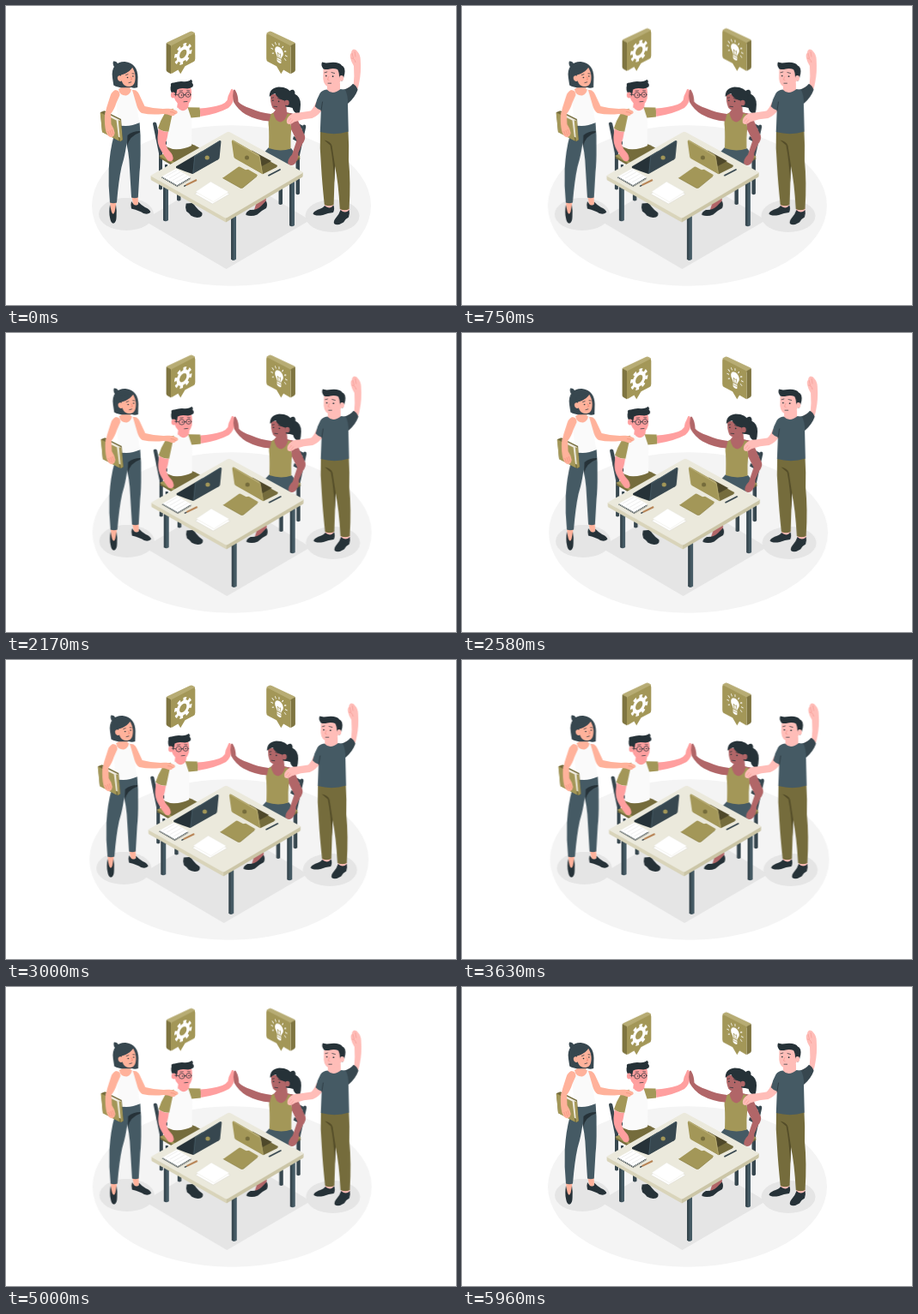
These frames come from a looping animation (524 by 349 pixels, 6000 ms). An HTML page:

```html
<!DOCTYPE html>
<html lang="en">
<head>
<meta charset="utf-8">
<title>Team at a table</title>
<style>
html, body { margin: 0; width: 100%; height: 100%; overflow: hidden; background: #fff; }
svg { display: block; width: 100%; height: 100%; }
.olive { fill: #a39758; }
.moss { fill: #756c3c; }
.slate { fill: #455a64; }
.deep { fill: #37474f; }
.ink { fill: #263238; }
.white { fill: #fafafa; }
.peach { fill: #ffb29b; }
.pink { fill: #ff9f9f; }
.rose { fill: #ffbdb8; }
.brown { fill: #b16668; }
.line { fill: none; stroke: #263238; stroke-width: .7; stroke-linecap: round; stroke-linejoin: round; }
.lit { fill: none; stroke: #fff; stroke-linecap: round; }
</style>
</head>
<body>
<svg viewBox="0 0 524 349">
<defs>
  <g id="tile">
    <path fill="#b7ac74" d="M187 43.5 Q187 42.7 188 42.2 L214 29.9 Q216 29 217.5 30 L220 31.4 L220 34 L192 48 Z"/>
    <path fill="#7f7541" d="M186.6 43.2 L192 46.2 L192 79.2 L188 77 Q186.6 76 186.6 74.5 Z"/>
    <path class="olive" d="M192 48.2 Q192 46.5 193.5 45.7 L217.5 33.2 Q220.3 31.8 220.3 34.5 L220.3 61.5 Q220.3 64 218.5 65 L208.5 70.2 L203.2 79.2 L200.4 74.5 L193.6 78.6 Q192 79.6 192 77.5 Z"/>
  </g>
</defs>

<g id="scene">
  <ellipse cx="262.5" cy="233" rx="162.5" ry="93.7" fill="#f4f4f4"/>
  <g fill="#e5e5e5">
    <ellipse cx="140" cy="243" rx="32" ry="19"/>
    <ellipse cx="380" cy="245" rx="31.5" ry="19"/>
    <path d="M160 250 L256.5 307 L354 250 L258 192 Z"/>
  </g>

  <!-- chairs -->
  <g class="deep">
    <path d="M171 137.5 Q171 135.6 173 135.5 Q174.8 135.5 175.2 137 L182 168 L182 213.5 Q180 215.5 178 213.5 L178 172 Z"/>
    <path d="M174 151 L187 158 L187 162 L175 156 Z"/>
    <path d="M199 185 H203.5 V226.5 Q201.2 228.5 199 226.5 Z"/>
    <path d="M185 185 H188 V205 H185 Z"/>
    <path d="M349.3 141 Q349.3 138.6 347.2 138.6 Q345.6 138.8 345.2 140.5 L337.5 172 L337.5 219 Q339.7 221.5 342 219 L342 174 Z"/>
    <path d="M335 134 L346 140 L345 143.5 L335 138 Z"/>
    <path d="M335 152 L344 157 L343.2 160.5 L334 155.5 Z"/>
    <path d="M317.5 190 H322 V231 Q319.7 233 317.5 231 Z"/>
  </g>
  <path class="moss" d="M178 177 L202 167 L224 178 L200 190 Z"/>
  <path class="olive" d="M178 175 L202 164 L224 175 L200 187 Z"/>
  <path class="moss" d="M300 178 L324 167 L343 178 L322 191 Z"/>
  <path class="olive" d="M300 175 L324 164 L343 176 L322 188 Z"/>

  <!-- woman standing -->
  <g>
    <path class="peach" d="M121 226 L128.5 226 L127.5 240 L125 247 L122 240 Z M146 221 L153.5 221 L154 231 L149 235 Z"/>
    <path class="ink" d="M121 232 Q119.6 241 121 247 Q122 253.5 125 253.8 Q128.5 253 128.6 246 Q129.2 239 128 232 L126.6 240 Q124.8 245.5 122.8 240 Z"/>
    <path class="ink" d="M146 228 Q144.8 232 146 236.5 Q156 239 160 242 Q166 243.7 168.3 240.8 Q168 237.5 162 235 Q157 232 154 228.5 Q155 234 149 232 Z"/>
    <path class="slate" d="M136 139 L155.5 136 Q157 150 156.6 166 Q156.8 182 155.5 194 L153.8 223.5 Q150 225 146 223.5 L144 190 Q143.5 170 138 152 Z"/>
    <path class="slate" d="M130 138.5 Q142 141 155 136.5 L155.8 146 Q147 147 141.5 151 Q140 170 134.5 188 Q131 204 129 229.5 Q125 231 121 229.5 Q119 210 119.7 190 Q121 168 125.5 152 Z"/>
    <path class="ink" d="M156 146 Q147 146 141.5 151 L141 164 Q143 152 156 147.5 Z"/>
    <path class="peach" d="M131 97 Q136 95 136.5 90 L145 92 L144.5 97 L151.5 98.5 L148 106 L132 106 Z"/>
    <path class="white" d="M131 97.5 Q133 105 140 104.5 Q145 103 146 97 L150.5 97.5 Q153 104 152.5 112 Q153 125 155.3 136.3 Q143 142 129.5 138.7 Q130.5 125 128 112 Q127 102 131 97.5 Z"/>
    <path class="deep" d="M124 84 C122 71 129 64.6 138.5 65 C149 66 153.5 74 153.5 83 L153.2 95 Q149 96.5 146 95 L138 95.3 Q130 95.5 125.3 92.5 Z"/>
    <path class="deep" d="M126.8 72 Q123.6 68.5 125 64.6 Q128.5 64 130.5 68 Z"/>
    <path class="peach" d="M134 80 C139 79 144.5 75.5 147 71.5 C150 76 151.4 82 150.2 87.5 C149 94.5 143 95.3 138 92.4 C135 90 133.6 85.5 134 80 Z"/>
    <ellipse class="peach" cx="132.8" cy="84.6" rx="2.9" ry="3.4" transform="rotate(-15 132.8 84.6)"/>
    <path class="deep" d="M132 74 L148 70 Q145 77.5 134 80.5 Q130 80 132 74 Z"/>
    <circle class="ink" cx="141.5" cy="83.5" r=".8"/><circle class="ink" cx="147.9" cy="82" r=".8"/>
    <path class="line" d="M139.5 80.6 L142 79.6 M147 78.8 L149 79 M143 89.6 L145.8 88.8"/>
    <path fill="none" stroke="#ef7d6b" stroke-width=".7" d="M145.2 82.5 L146.6 85.6 L144.8 86.2"/>
    <!-- books -->
    <path class="moss" d="M110 124 L114.5 122.3 L134 132 L136 156.5 L133 158 L112 147 Z"/>
    <path fill="#eeeade" d="M115 124 L133.2 133.3 L135 154.5 L129 152 Z"/>
    <path class="olive" d="M109.6 124.2 L128.5 133.6 L131.5 157.5 L112 147.3 Z"/>
    <path class="olive" d="M130.8 133.2 L133.6 134 L135.6 156 L133 158 Z"/>
    <path class="peach" d="M127 98 Q132.5 98 132.5 104 L128.5 113 Q126 121 122 126 L122.5 138 Q126 143 126.6 148 Q126 154 121 153 Q117.5 151 116.3 146 Q114.4 138 115 127 Q117 118 120.5 108 Q122.5 100 127 98 Z"/>
    <path fill="none" stroke="#ef8a78" stroke-width=".6" d="M118.6 146 L120.5 151 M121 145 L123 151.5 M123 144 L125 150"/>
  </g>

  <!-- man seated -->
  <g>
    <path class="ink" d="M209.7 230.5 Q208.3 235 210 239.5 Q213 241.5 215.5 244.8 Q220 247.8 226 246.6 Q229.3 245 228.3 241.3 Q224 238.5 221 234.5 Q219 231 216.5 230 Z"/>
    <path class="moss" d="M187 164 Q200 160 214 160.5 Q224 163 232 172 L228 184 L206 187 L190 179 Z"/>
    <path class="pink" d="M200 111 L213 112 L212 121 Q206 127 199 120 Z"/>
    <path class="white" d="M193 121 L200 118.5 Q206 126 212 118.5 L216 120 Q216.5 139 216 163 Q207 168 194 167 L187.5 164.5 Q188 153 189 143 Z"/>
    <path class="olive" d="M195 119.8 Q188 120 184.5 126 Q180 133 177 142.5 Q182 147 189.3 146.8 L192 134 Z"/>
    <path class="olive" d="M211.5 118.3 L225.5 118.6 Q227 124 226 129.5 L215.5 130.5 Z"/>
    <path class="pink" d="M225.8 119.4 Q239 118.8 251 115 Q256 112.8 257.6 110 Q258.5 104 261 100 Q262.2 96 263.7 97 Q265.7 98.5 265.3 106 Q265 114 259 119 Q246 126 226.3 129 Z"/>
    <path class="pink" d="M177.5 143.2 Q183 147 189 146.8 Q188 154 185.8 160 Q187 166 191 170 Q195 174 194.5 179 Q193 182.5 188.5 180.5 Q184.5 176 180.5 168.5 Q176 161 176.5 153 Z"/>
    <path class="pink" d="M195 96 Q202 92 214.5 93 Q217 100 215.7 108 Q213.5 116 207 116.3 Q198 115.5 195.5 106 Z"/>
    <path class="ink" d="M193.6 103 Q190.5 97 192 93 Q191 89.5 195.5 89.6 Q202 87.2 207 88.2 Q213 88.5 215.6 85.8 Q217.8 87.6 216.6 89.8 Q218.8 91.5 217.4 94.3 Q214.5 97 209 96.3 Q202.5 95.4 199.3 97.6 Q198.5 102 197.6 105.5 Z"/>
    <ellipse class="pink" cx="194.6" cy="104" rx="2.7" ry="3.4"/>
    <g class="line"><circle cx="204" cy="104" r="3.2"/><circle cx="212" cy="103.5" r="2.9"/><path d="M196 103.2 L200.8 103.8 M207.2 103.6 H209.1 M202 99.2 L205.5 98.9 M210.8 98.7 L213.6 99 M207 111.8 L211 111.4"/></g>
    <circle class="ink" cx="204.6" cy="104" r=".8"/><circle class="ink" cx="212.2" cy="103.5" r=".8"/>
  </g>
  <path class="peach" d="M147 98 Q152.5 97.5 155 103 L161.5 117 Q174 120.5 187 119.8 Q194 119 199 122.5 Q201 125.5 197 126.2 Q196 129 192 128 Q188 126 183 126 Q169 127.5 158 125 Q154.5 123 152.5 117 Z"/>
  <path fill="none" stroke="#ef8a78" stroke-width=".6" d="M191 123.5 Q195 123.5 197.5 126"/>

  <!-- woman seated -->
  <g>
    <path class="brown" d="M294 222 L303 222 L302.5 232 Q297 238 289 238 Z"/>
    <path class="ink" d="M302.8 227.5 Q305 232 303 236 Q297 239 292.5 243.4 Q286 246.3 279.5 244 Q278.5 241 284 238 Q292 238.5 297 233.5 Z"/>
    <path class="slate" d="M306 165 Q320 170 332 166 Q338 172 336 183 L322 190 L296 176 Z"/>
    <path class="ink" d="M328 105 Q331 101.5 336 102.5 Q343 105.5 343 115 Q343 121 341.3 126 Q335 125.5 333.6 119 L326 117 Z"/>
    <path class="ink" d="M329.5 101.5 Q330.5 97 334.5 97.8 Q337 99.5 336.3 103 L331 106 Z"/>
    <path class="brown" d="M315 117 L326 113 L327 124 Q332 125 334.5 127 L327 139 L312 137 L306 127 Q314 125 315 117 Z"/>
    <path class="brown" d="M331 125 Q336.5 125 338.8 131 Q343 141 348 151.5 Q349 156 345 161 L340.5 171 Q340.5 180 336 184.5 Q331 188 328.2 183.5 Q328 178.5 333 173.5 L338.5 157 L331.5 143 Z"/>
    <path class="olive" d="M307 126.7 Q309.5 126 311.5 124.8 Q313 135 320 135.4 Q326 133.5 327.6 125.5 L331 126 Q329.5 134 332.3 142 Q331 154 331.5 166.5 Q319 170.5 306 166 Q306.5 152 306 142 Q304.8 133 307 126.7 Z"/>
    <path class="brown" d="M308.5 126 Q296 124.5 284.5 119.5 Q274 116 270.5 111.8 Q270.2 104 267.2 98.8 Q266 96.2 264.8 98.5 Q263.3 105 265 112 Q270 121 279 126.5 Q292 133.5 306.5 134.5 Z"/>
    <path class="brown" d="M308.3 102 L327 105 Q328 116 321.5 120.3 Q313.5 123.5 310.2 118.5 Q307 111 308.3 102 Z"/>
    <path class="ink" d="M306.8 106 Q306.3 96 317.5 94.6 Q330 94.6 333 103.5 Q334.3 112 330.5 118 L325.5 117.5 L324.5 110.5 Q316 108.5 313.3 102 Q309.5 103 306.8 106 Z"/>
    <ellipse class="brown" cx="327" cy="113" rx="2.7" ry="3.3"/>
    <circle class="ink" cx="310.8" cy="110.2" r=".8"/><circle class="ink" cx="317.6" cy="111.4" r=".8"/>
    <path class="line" d="M309.5 107.3 L311.5 106.8 M316.6 107.7 L319.6 108.7 M312 117.2 L315.6 117.6"/>
  </g>

  <!-- man standing -->
  <g>
    <path class="rose" d="M371 230 H381 V238 H371 Z M389.5 235 H399.5 V243 H389.5 Z"/>
    <path class="ink" d="M371 233 Q369 236 363 237.7 Q358 240 357.5 242.5 Q360 245.6 369 244 Q375 241.5 381 241 Q383 237 381.4 232.5 Q377 238 371 233 Z"/>
    <path class="ink" d="M389.5 238 Q388 243 384 247.5 Q381 251 382 254 Q386 257 393 252.5 Q395 248.5 399 246.5 Q400.5 242 399.6 238 Q395 243 389.5 238 Z"/>
    <path class="moss" d="M366 146 L398.5 146 Q399.5 162 399 180 Q401.5 205 399.6 237 Q394.5 239.5 388.8 237 Q387 205 383 187 L381.6 232 Q376 234.5 370.8 232 Q368 205 367 187 Q365 166 366 146 Z"/>
    <path fill="#544d29" d="M370.5 156.5 Q378 158 379.5 163 L383 186 L382.3 206 Q381 180 377.5 162.5 Z"/>
    <path class="rose" d="M374 91 L389 90 L389 100 Q382 106 374 100 Z"/>
    <path class="rose" d="M404.5 95 Q406 82 405 70 Q402 65.5 401 60.5 Q400.2 56.4 402 55 Q402.2 51.2 405 50.6 Q408 50.8 409 53 Q412.8 56.8 412.8 63 Q413.8 77 411.3 89 Q410 97 407 102 L399 105 L398 95 Z"/>
    <path fill="none" stroke="#f3958f" stroke-width=".6" d="M403 55 L404.5 61 M406 53 L407 59.5 M402 61 Q406 61 407 66"/>
    <path class="rose" d="M361 112 L370 119 Q364 128 356.5 131 Q346 131.5 336 135.3 Q330.5 139.4 327.4 137 Q325.5 133 329.5 128.5 Q334 124 341 124.5 L354.5 122.5 Q358.5 119 361 112 Z"/>
    <path fill="none" stroke="#f3958f" stroke-width=".6" d="M328.5 135 L332 131 M331 137 L334 132.6"/>
    <path class="deep" d="M392 98 Q400 96 404 90.8 Q408 93 409.6 97.8 Q406.5 107 398 114 Z"/>
    <path class="slate" d="M373.5 97.5 Q380 104.5 389.5 97 L395 97.8 Q398.5 105 398 114 L398.8 146.5 Q383 151.5 365.8 147 L366.8 121.7 Q363 121 359.8 117.3 Q361.5 109 365.5 102 Q368 98 373.5 97.5 Z"/>
    <path class="line" stroke="#37474f" d="M367 122 L368.5 112"/>
    <path class="rose" d="M369.5 74 Q378 70 389 75 Q392 82 388.8 89.5 Q384 96 377 95.3 Q370 93 369.3 85 Z"/>
    <path class="ink" d="M369.5 73.6 Q366.3 69.5 368 65.6 Q371 67 378 66 Q388 65.2 391 69.5 Q395.4 71.5 394.3 79 Q393.6 84 391 88 L388 83 Q388 77 386 74 Q381 72.4 377 73.6 Q373 74.6 369.5 73.6 Z"/>
    <ellipse class="rose" cx="390.6" cy="84.3" rx="2.5" ry="3.3"/>
    <circle class="ink" cx="372.8" cy="81.5" r=".85"/><circle class="ink" cx="380.6" cy="82.2" r=".85"/>
    <path class="line" d="M371 77.8 L373.8 77 M379 77.5 L382.6 78.5 M375 90.2 L378.6 90.2"/>
    <path fill="none" stroke="#f3958f" stroke-width=".7" d="M376 82 L374.3 86 L376.4 86.6"/>
  </g>

  <!-- table -->
  <g class="slate">
    <path d="M183 205 H189 V250 Q186 252.7 183 250 Z"/>
    <path d="M330 203 H336 V256 Q333 258.7 330 256 Z"/>
    <path d="M262 244 H268 V295.5 Q265 298.3 262 295.5 Z"/>
  </g>
  <path class="deep" d="M183 205 H185.5 V251.3 L183 250 Z M330 203 H332.5 V257.3 L330 256 Z M262 244 H264.5 V297 L262 295.5 Z"/>
  <path fill="#d9d4ba" d="M168.6 198 L256 247 V252.5 L169.5 203.5 Q168.6 202.8 168.6 201.5 Z"/>
  <path fill="#cbc5a6" d="M345.7 194 L256 247 V252.5 L345 199.7 Q345.7 199 345.7 198 Z"/>
  <path fill="#ebe9dc" d="M169.5 197.3 L257.3 147.3 Q259 146.4 260.7 147.3 L345 193.4 Q346.3 194.3 345 195.2 L257.6 247 Q256 247.9 254.4 247 L169.5 199 Q168 198 169.5 197.3 Z"/>

  <!-- laptops -->
  <path class="ink" d="M198 187.3 L228 169.5 L247 178.5 L217 196 Q208 193 198 189 Z"/>
  <path class="deep" d="M219.5 175 L248.5 157.2 Q250.6 156.5 250.4 158.7 L248.6 177 Q248.4 178.5 247 179.3 L217.3 196 L219 177 Z"/>
  <path class="slate" d="M219.5 175 L248.5 157.2 L249.8 157.3 L220.2 175.8 L218.4 194.7 L217.3 196 Z"/>
  <ellipse class="olive" cx="234.2" cy="177" rx="2.6" ry="2.5"/>
  <path class="moss" d="M289 171.5 L316 186 Q316 187.8 314.5 188.6 L299 196.3 L268 178 Z"/>
  <path fill="#4e482a" d="M286 168.5 L309 181 L296 188 Z"/>
  <path class="olive" d="M265 156.8 L293.5 173.2 Q295.3 174.2 295.7 176 L299 196.3 L267 178.3 Q265.6 177.5 265.3 176 L262.8 158.5 Q262.7 156 265 156.8 Z"/>
  <path fill="#b7ac74" d="M264 156.6 L293.5 173.2 Q295.3 174.2 295.7 176 L299 196.3 L298 195.7 L294.8 176 L263.4 157.6 Z"/>
  <ellipse class="moss" cx="280.5" cy="177" rx="2.5" ry="2.5"/>

  <!-- stationery -->
  <path class="olive" d="M252.3 200.7 L269.6 188.4 Q271.5 187 273 188 L279 191.3 L282 190.8 L292.3 196.7 Q293.6 197.6 292 198.8 L276 211.9 Q274.5 213 272.7 212.2 Z"/>
  <path fill="none" stroke="#8c8148" stroke-width=".7" d="M252.3 200.7 L272.7 212.2 Q274.5 213 276 211.9 L292 198.8"/>
  <path fill="#fff" stroke="#d8d6cc" stroke-width=".5" d="M219.8 219.3 L240.5 231 L260.3 219.5 L240 207 Z"/>
  <path fill="#fff" stroke="#e4e2da" stroke-width=".4" d="M220.8 216.8 L238.3 205 L259.3 217 L241.5 228.6 Z"/>
  <path fill="#cfccc0" d="M181 200.5 L199.5 211.5 L215.3 202.3 V200.5 L198 190 Z"/>
  <path fill="#fff" d="M181.2 199.3 L198 189.7 L215.3 200 L199.3 209.6 Z"/>
  <path fill="none" stroke="#37474f" stroke-width="1.5" stroke-dasharray="1.1 .9" d="M181.5 199.8 L199.3 210 L214.5 200.9"/>
  <path fill="none" stroke="#e2e2e2" stroke-width=".6" d="M186 199 L199 191.6 M190 201.2 L203 193.8 M194 203.5 L207 196.1 M198 205.8 L211 198.4"/>
  <path fill="none" stroke="#b78354" stroke-width="2" d="M209.5 209.2 L222 203"/>
  <path fill="none" stroke="#263238" stroke-width="1.4" stroke-linecap="round" d="M207.8 210.2 L209 209.5"/>
  <path fill="none" stroke="#37474f" stroke-width="1.8" stroke-linecap="round" d="M306 197.7 L319 191"/>
</g>

<g class="bubble">
  <use href="#tile"/>
  <g class="lit" transform="matrix(.87 -.45 0 1 206.2 56)" style="stroke-linecap:butt">
    <circle r="6.8" stroke-width="4"/>
    <circle r="10" stroke-width="3.6" stroke-dasharray="4 3.854"/>
  </g>
</g>
<g class="bubble">
  <use href="#tile" transform="matrix(-1 0 0 1 523.5 0)"/>
  <g transform="matrix(.87 .45 0 1 318 55)">
    <path fill="#fff" d="M-2.8 5.6 Q-2.8 4.2 -4.3 2 A5.6 5.6 0 1 1 4.3 2 Q2.8 4.2 2.8 5.6 Z M-2.8 6.5 H2.8 V10.5 Q0 13 -2.8 10.5 Z"/>
    <path fill="none" stroke="#a39758" stroke-width=".7" d="M-1 5.6 L-2 0 L0 1.4 L2 0 L1 5.6 M-2.8 8.5 H2.8"/>
    <g id="rays" class="lit" stroke-width="1"></g>
  </g>
</g>
</svg>
<script>
const LOOP = 6000, UNIT = 0.698;
const move = (el, axis, duration, steps) => el.animate(
  steps.map(([offset, d]) => ({ offset, transform: `translate${axis}(${d * UNIT}px)` })),
  { duration, iterations: Infinity, easing: 'linear' });

const rays = document.getElementById('rays');
for (let i = 0; i < 9; i++) {
  const a = Math.PI * (0.83 + i * 1.34 / 8);
  const at = r => `${r * Math.cos(a)} ${r * Math.sin(a) - 1}`;
  const ray = document.createElementNS(rays.namespaceURI, 'path');
  ray.setAttribute('d', `M${at(8.4)} L${at(10.6)}`);
  rays.append(ray);
}

// the whole group shivers sideways while the bubbles float
const shake = [[0, 0], [.1, -1], [.2, 2], [.3, -4], [.4, 4], [.5, -4],
  [.6, 4], [.7, -4], [.8, 2], [.9, -1], [1, 0]];
const float = [[0, 0], [.5, -10], [1, 0]];
const moves = [move(document.getElementById('scene'), 'X', LOOP, shake)];
document.querySelectorAll('.bubble').forEach(b => moves.push(move(b, 'Y', LOOP / 2, float)));
moves.forEach(m => { m.startTime = 0; });
</script>
</body>
</html>
```
